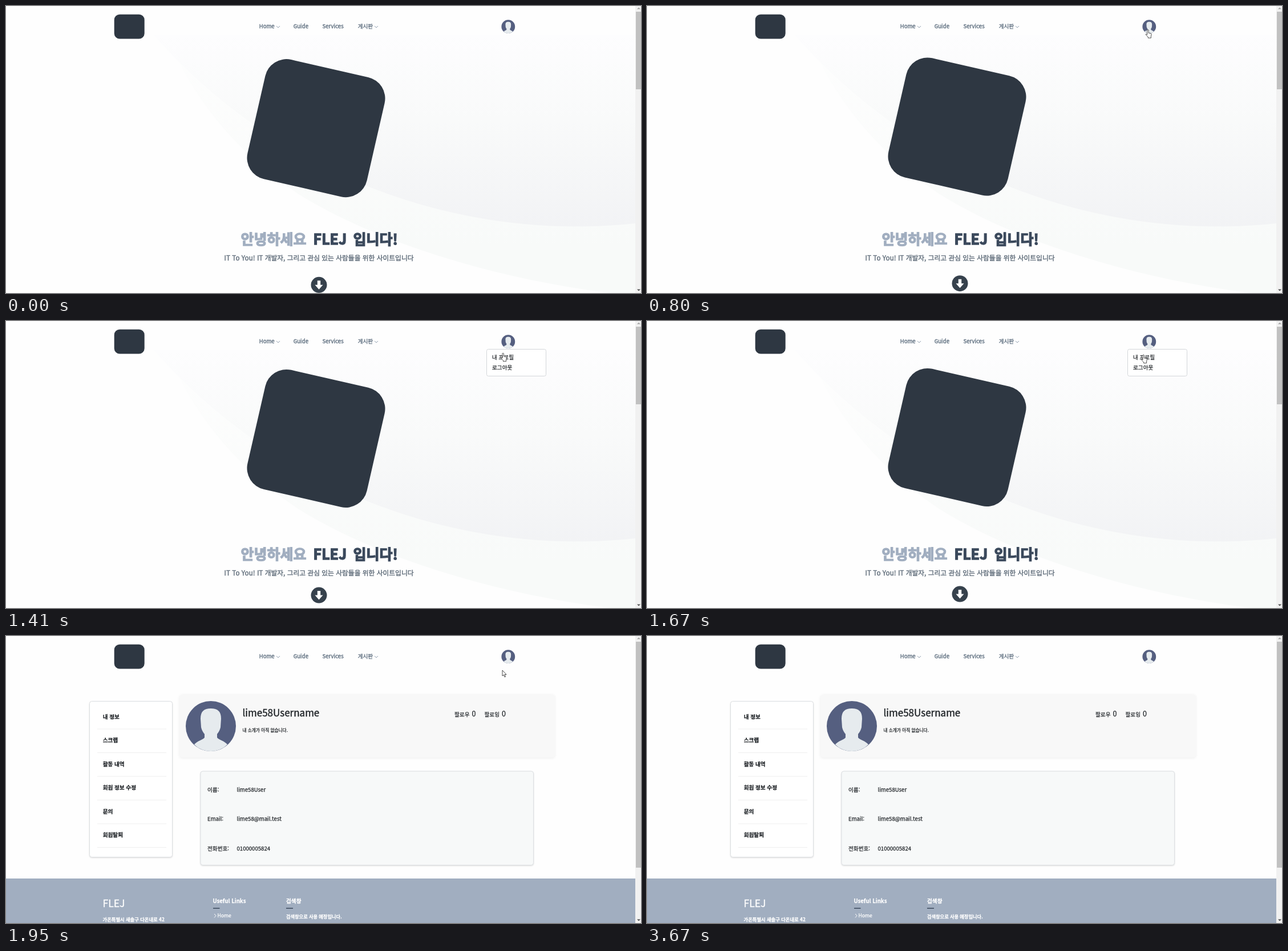
An HTML page that plays this animation: 1113x503 px, repeating every 3960 ms.

```html
<!DOCTYPE html>
<html lang="ko">
<head>
<meta charset="utf-8">
<style>
html, body { margin: 0; width: 100%; height: 100%; overflow: hidden; background: #fefefe; }
svg { display: block; width: 1113px; height: 503px; }
text {
  font: 500 9.6px "Noto Sans CJK KR", "Noto Sans CJK", sans-serif; white-space: pre;
  color: #212529; fill: currentColor; stroke: currentColor; stroke-width: .25px;
}
.nav text { color: #637383; stroke-width: .4px; }
.title text { font-size: 25px; font-weight: 900; color: #3b495c; stroke-width: 1.3px; }
.foot text { color: #fff; }
.line { fill: none; stroke: #94a1b0; }
.card { stroke: #dcdfe2; filter: drop-shadow(0 1px 1px #0002); }
</style>
</head>
<body>
<svg viewBox="0 0 1113 503">
  <defs>
    <linearGradient id="pale" x1="0" y1="50" x2="0" y2="420" gradientUnits="userSpaceOnUse">
      <stop stop-color="#fefefe"/><stop offset="1" stop-color="#f8faf9"/>
    </linearGradient>
    <linearGradient id="mist" x1="0" y1="50" x2="0" y2="386" gradientUnits="userSpaceOnUse">
      <stop stop-color="#fdfdfe"/><stop offset=".45" stop-color="#f9fafa"/><stop offset="1" stop-color="#f2f3f5"/>
    </linearGradient>
    <g id="person">
      <circle r="44" fill="#555f80"/>
      <path fill="#e6ebee" d="M-18-13C-18-26-12-31 0-31S18-26 18-13L17 2C15 10 12 12 11 14V20C14 24 24 26 29 32C22 40 10 44 0 44S-22 40-29 32C-24 26-14 24-11 20V14C-12 12-15 10-17 2Z"/>
    </g>
  </defs>

  <g id="home">
    <path fill="url(#pale)" d="M280 50C330 170 410 260 510 328C640 410 850 478 1060 503H1103V50Z"/>
    <path fill="url(#mist)" d="M258 50A987 987 0 0 0 1103 381V50Z"/>
    <rect id="tile" x="-107.3" y="-107.3" width="214.6" height="214.6" rx="38" fill="#2e3742"/>
    <g class="title">
      <text x="411.5" y="418" style="color:#a1aec0">안녕하세요</text>
      <text x="538.5" y="418">FLEJ</text>
      <text x="608.5" y="418">입니다!</text>
    </g>
    <text x="548.5" y="446" text-anchor="middle" style="font-size:11.75px;color:#616e7b;stroke-width:.4px">IT To You! IT 개발자, 그리고 관심 있는 사람들을 위한 사이트입니다</text>
    <g id="down">
      <circle r="14" fill="#36414c"/>
      <path fill="#fff" d="M-2.7-7.5H2.7V0H7L0 8-7 0H-2.7Z"/>
    </g>
  </g>

  <g id="profile">
    <rect class="card" x="146.5" y="114.5" width="145" height="273" rx="4" fill="#fff"/>
    <g id="menu"></g>
    <rect x="304" y="102.5" width="658" height="110.5" rx="5" fill="#f8f8f8" style="filter:drop-shadow(0 1px 2px #0001)"/>
    <use href="#person" x="359" y="158"/>
    <text x="414.5" y="140.5" style="font-size:17px;stroke-width:.4px">lime58Username</text>
    <text x="414.5" y="167.5" style="font-size:7.7px">내 소개가 아직 없습니다.</text>
    <text x="786" y="140.5">팔로우</text><text x="816.5" y="141" style="font-size:12.5px">0</text>
    <text x="838.5" y="140.5">팔로잉</text><text x="869" y="141" style="font-size:12.5px">0</text>
    <rect class="card" x="341" y="237" width="583.5" height="164.5" rx="4" fill="#f7f9f9"/>
    <g id="info"></g>
    <g class="foot">
      <rect y="425" width="1103" height="78" fill="#a1aec0"/>
      <text x="169.5" y="474.5" style="font-size:17.5px;stroke-width:.4px">FLEJ</text>
      <text x="169.5" y="499.5" style="font-size:8.3px;font-weight:700">가온특별시 새솔구 다온내로 42</text>
      <text x="362.5" y="468" style="font-weight:600">Useful Links</text>
      <text x="491" y="468" style="font-weight:600">검색창</text>
      <text x="491" y="495.3" style="font-size:8.2px;font-weight:700">검색창으로 사용 예정입니다.</text>
      <path stroke="#3b495c" stroke-width="1.4" d="M363 477.3H374.5M491 477.3H503"/>
      <path fill="none" stroke="#fff" d="M365 487L368 490.3 365 493.6"/>
      <text x="370.5" y="493.3" style="font-size:8.6px">Home</text>
    </g>
  </g>

  <g class="nav">
    <rect x="189.7" y="14.7" width="53" height="42.8" rx="9.5" fill="#2e3742"/>
    <text x="443.7" y="39.3">Home</text>
    <text x="503.7" y="39.3">Guide</text>
    <text x="554.5" y="39.3">Services</text>
    <text x="616.7" y="39.3">게시판</text>
    <path class="line" d="M474 35L477 38 480 35M646 35L649 38 652 35"/>
    <use href="#person" transform="translate(880.3 36.2) scale(.27)"/>
  </g>

  <g id="drop">
    <rect x="842.5" y="49.5" width="104" height="47" rx="3" fill="#fff" stroke="#d3d6d9"/>
    <rect id="press" x="843" y="54.5" width="103.5" height="18.5" fill="#0d6efd"/>
    <text id="mine" x="852" y="66.5">내 프로필</text>
    <text x="852" y="85.3">로그아웃</text>
  </g>

  <rect x="1103" width="10" height="503" fill="#f1f1f1"/>
  <rect id="thumb" x="1104" y="10" width="9" fill="#c1c1c1"/>
  <path fill="#a3a3a3" d="M1106 5.5H1112L1109 2.5Z"/>
  <path fill="#505050" d="M1106 496.5H1112L1109 499.5Z"/>

  <g id="cursor" fill="#fff" stroke="#222" stroke-width=".8" stroke-linejoin="round">
    <path id="arrow" d="M0 0V10L2.3 8 4 12 5.6 11.3 4 7.5H7Z"/>
    <path id="hand" transform="translate(-4 -1)" d="M3 9V1.5a1.2 1.2 0 0 1 2.4 0V6l4 .8q1.2.3 1 1.6L9.6 12V14.8H4.5V13L.6 9.2q-.6-1 .3-1.4z"/>
  </g>
</svg>
<script>
const LOOP = 3960, OPEN = 1200, PRESS = 1800, PROFILE = 1950;
const $ = id => document.getElementById(id);
const show = (id, on) => $(id).style.display = on ? '' : 'none';
const move = (id, x, y, more = '') => $(id).setAttribute('transform', `translate(${x} ${y}) ${more}`);

$('menu').innerHTML = ['내 정보', '스크랩', '활동 내역', '회원 정보 수정', '문의', '회원탈퇴'].map((s, i) =>
  `<text x="169.7" y="${144.7 + i * 41.5}" style="font-weight:600">${s}</text>
   <path stroke="#efefef" d="M160 ${163 + i * 41.5}H281"/>`).join('');
$('info').innerHTML = [['이름:', 'lime58User'], ['Email:', 'lime58@mail.test'], ['전화번호:', '01000005824']].map(([k, v], i) =>
  `<text x="353" y="${272.8 + i * 51.5}">${k}</text><text x="404.5" y="${272.8 + i * 51.5}">${v}</text>`).join('');

// pointer stops: time, x, y
const path = [
  [70, 1051, 470], [540, 889, 90], [670, 878, 41], [1070, 877, 46], [1130, 877, 46],
  [1410, 871, 57], [1600, 870, 60], [2940, 870, 60], [3480, 1043, 468], [3600, 1073, 495], [3670, 1081, 512]
];

function pointer(t) {
  const i = path.findIndex(p => p[0] > t);
  if (i < 1) return null;
  const [a, b] = [path[i - 1], path[i]];
  const p = (t - a[0]) / (b[0] - a[0]), e = p * p * (3 - 2 * p);
  return [1, 2].map(k => a[k] + (b[k] - a[k]) * e);
}

function draw() {
  const t = performance.now() % LOOP;
  const lift = 6 * (1 - Math.cos(Math.PI * (t - 150) / 2000));
  const home = t < PROFILE, pressed = t >= PRESS;
  show('home', home);
  show('profile', !home);
  move('tile', 543.5, 214.3 - lift, 'rotate(12.9)');
  move('down', 548.5, 489 - lift);
  show('drop', home && t >= OPEN);
  show('press', pressed);
  $('mine').style.color = pressed ? '#6c7a8d' : '';
  $('thumb').setAttribute('height', home ? 136 : 396);

  const at = pointer(t), hand = t >= 620 && !pressed;
  show('cursor', at);
  show('hand', hand);
  show('arrow', !hand);
  if (at) move('cursor', ...at);
  requestAnimationFrame(draw);
}
draw();
</script>
</body>
</html>
```
